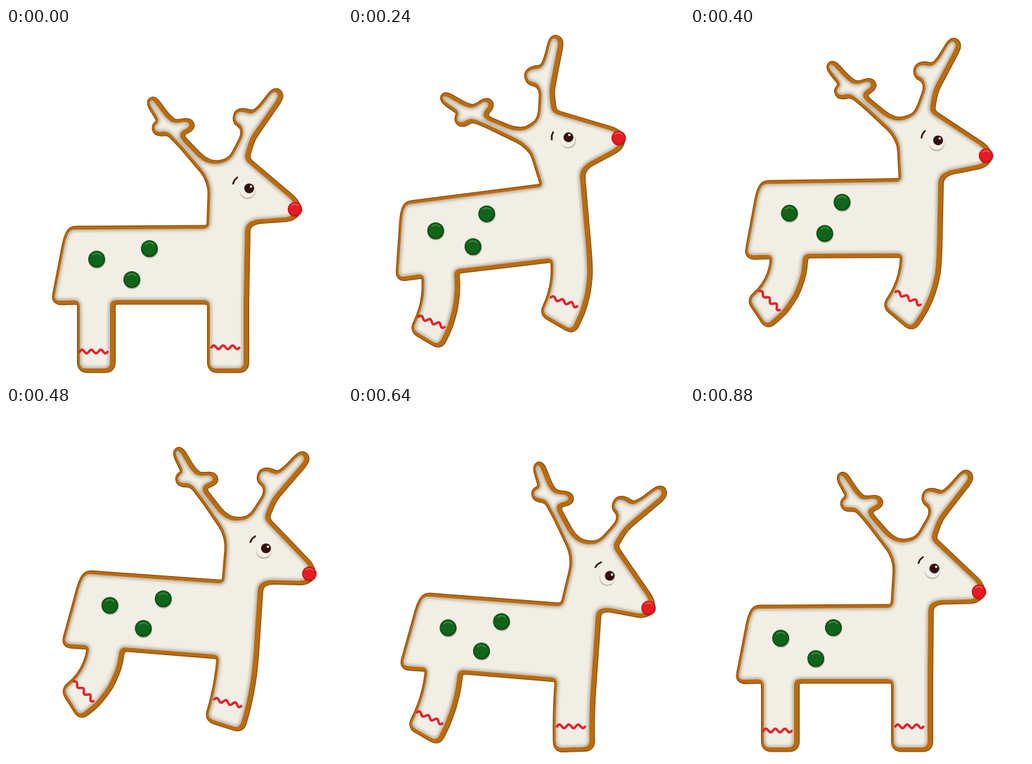
Recreate the animation shown at these times as an HTML page with a canvas. Size 478 by 498 pixels, loop 960 ms.

```html
<!DOCTYPE html>
<html lang="en">
<head>
<meta charset="utf-8">
<title>Gingerbread reindeer</title>
<style>
html, body { margin: 0; width: 100%; height: 100%; overflow: hidden; background: #fff; }
canvas { display: block; }
</style>
</head>
<body>
<canvas id="stage" width="478" height="498"></canvas>
<script>
const ctx = document.getElementById('stage').getContext('2d');
const LOOP = 960, STEP = 80, HIP = 388, LEG = 95;

// time, body x y angle, nose x y angle, rear and front leg bend (degrees)
const poses = [
  [0, 171, 333, 0, 411, 257, 0, 0, 0],
  [160, 158.5, 323, -11.4, 380, 207, -9.5, 25, 25],
  [240, 167, 287.5, -7, 385, 156, -23.7, 38, 37],
  [320, 177, 272, -4, 406, 163, -15, 50, 40],
  [400, 183.5, 267.5, -0.5, 421, 181, -6.8, 57, 40],
  [560, 195, 312, 9.3, 442, 292, 18.6, 50, -13],
  [720, 172.7, 331.5, 0, 413, 278, 11.6, 0, 0],
  [880, 171, 333, 0, 411, 262, 3, 0, 0],
  [960, 171, 333, 0, 411, 257, 0, 0, 0]
];

// Resting outlines: tail up to the neck, then around the antlers and face
const tail = [[68, 387], [85, 299], [91, 286], [105, 286], [289, 285]];
const head = [
  [291, 226], [284, 207], [250, 167], [230, 146], [214, 148], [210, 140],
  [219, 132], [203, 106], [208, 101], [228, 128], [239, 136], [258, 132],
  [262, 140], [248, 147], [247, 156], [277, 187], [293, 194], [312, 191],
  [322, 183], [338, 152], [336, 138], [326, 132], [327, 121], [336, 118],
  [350, 123], [361, 114], [378, 92], [384, 90], [388, 97], [347, 156],
  [338, 186], [409, 246], [413, 258], [405, 268], [352, 272], [340, 280]
];
const rear = { x: 126.5, half: 21.5, stripe: 459 };
const front = { x: 314, half: 24, stripe: 453 };
const dots = [[129, 328], [204, 313], [179, 357]];

const rad = deg => deg * Math.PI / 180;

function poseAt(time) {
  const i = poses.findIndex(p => p[0] > time);
  const a = poses[i - 1], b = poses[i];
  const k = (time - a[0]) / (b[0] - a[0]);
  return a.map((v, n) => v + (b[n] - v) * k);
}

function rigid(ax, ay, x, y, deg) {
  const c = Math.cos(rad(deg)), s = Math.sin(rad(deg));
  return ([px, py]) => [x + (px - ax) * c - (py - ay) * s, y + (px - ax) * s + (py - ay) * c];
}

// Curls a leg along an arc that begins at the hip
function curl(leg, deg) {
  const k = rad(deg) / LEG || 1e-6;
  return ([px, py]) => {
    const a = k * (py - HIP), u = px - leg.x;
    return [leg.x - (1 - Math.cos(a)) / k + u * Math.cos(a), HIP + Math.sin(a) / k + u * Math.sin(a)];
  };
}

function legOutline(leg) {
  const right = [], left = [];
  for (let i = 0; i <= 4; i++) {
    const y = HIP - 2 + (LEG + 2) * i / 4;
    right.push([leg.x + leg.half, y]);
    left.unshift([leg.x - leg.half, y]);
  }
  return right.concat(left);
}

function roundedPath(points) {
  const path = new Path2D(), n = points.length;
  const dist = (a, b) => Math.hypot(a[0] - b[0], a[1] - b[1]);
  const last = points[n - 1], first = points[0];
  const svg = [];
  points.forEach((p, i) => {
    const a = points[(i + n - 1) % n], b = points[(i + 1) % n];
    const toward = q => {
      const k = Math.min(9, dist(p, q) / 2) / dist(p, q);
      return [p[0] + (q[0] - p[0]) * k, p[1] + (q[1] - p[1]) * k];
    };
    const from = toward(a), to = toward(b);
    path[i ? 'lineTo' : 'moveTo'](...from);
    path.quadraticCurveTo(...p, ...to);
  });
  path.closePath();
  return path;
}

function disc([x, y], r, fill) {
  ctx.fillStyle = fill;
  ctx.beginPath();
  ctx.arc(x, y, r, 0, 7);
  ctx.fill();
}

function line(points, color, width) {
  ctx.strokeStyle = color;
  ctx.lineWidth = width;
  ctx.beginPath();
  points.forEach(p => ctx.lineTo(...p));
  ctx.stroke();
}

function candy([x, y], r, light, base, dark) {
  const g = ctx.createRadialGradient(x - r * 0.1, y - r * 0.2, r * 0.2, x, y, r);
  g.addColorStop(0, base);
  g.addColorStop(0.7, base);
  g.addColorStop(1, dark);
  disc([x + 0.5, y + 1.5], r, 'rgba(60,40,20,.3)');
  disc([x, y], r, g);
  ctx.strokeStyle = light;
  ctx.lineWidth = 1.5;
  ctx.beginPath();
  ctx.arc(x, y, r * 0.68, -2.3, -0.8);
  ctx.stroke();
}

function cookie(path) {
  ctx.save();
  ctx.translate(2, 0.5);
  for (const [color, width] of [['#8f4f09', 12], ['#b86c12', 9.5]]) {
    ctx.strokeStyle = color;
    ctx.lineWidth = width;
    ctx.stroke(path);
  }
  ctx.fillStyle = '#b86c12';
  ctx.fill(path);
  ctx.restore();

  ctx.fillStyle = '#f1eee5';
  ctx.fill(path);
  ctx.save();
  ctx.clip(path);
  ctx.filter = 'blur(2px)';
  ctx.strokeStyle = 'rgba(110,90,60,.5)';
  ctx.lineWidth = 4;
  ctx.stroke(path);
  ctx.restore();
}

function draw(time) {
  const [, bx, by, ba, nx, ny, na, rearBend, frontBend] = poseAt(time);
  const onBody = rigid(171, 333, bx, by, ba);
  const onHead = rigid(411, 257, nx, ny, na);
  const onLeg = (leg, bend) => {
    const bent = curl(leg, bend);
    return p => onBody(bent(p));
  };
  const onRear = onLeg(rear, rearBend), onFront = onLeg(front, frontBend);

  ctx.clearRect(0, 0, 478, 498);
  ctx.lineJoin = ctx.lineCap = 'round';
  cookie(roundedPath([
    ...tail.map(onBody), ...head.map(onHead),
    ...legOutline(front).map(onFront), ...legOutline(rear).map(onRear)
  ]));

  for (const [leg, place] of [[rear, onRear], [front, onFront]]) {
    const wave = [];
    for (let u = -20; u <= 20; u++) wave.push(place([leg.x - 2 + u, leg.stripe - 2.6 * Math.sin(u * 0.47 + 3)]));
    line(wave, '#e3202a', 3.4);
  }
  dots.forEach(p => candy(onBody(p), 12, '#3f9347', '#11651a', '#0a4711'));

  line([[323, 221], [325, 216], [329, 212]].map(onHead), '#35150d', 2.4);
  disc(onHead([343.5, 231.5]), 11, 'rgba(90,75,55,.4)');
  disc(onHead([343.5, 230]), 10.8, '#f4f0e9');
  disc(onHead([346, 227.5]), 7, '#34100c');
  disc(onHead([348.5, 225]), 1.7, '#fff');
  candy([nx, ny], 10.3, '#f5605f', '#e71b21', '#b50f14');
}

function tick(now) {
  draw(Math.floor(now % LOOP / STEP) * STEP);
  requestAnimationFrame(tick);
}
draw(0);
requestAnimationFrame(tick);
</script>
</body>
</html>
```
